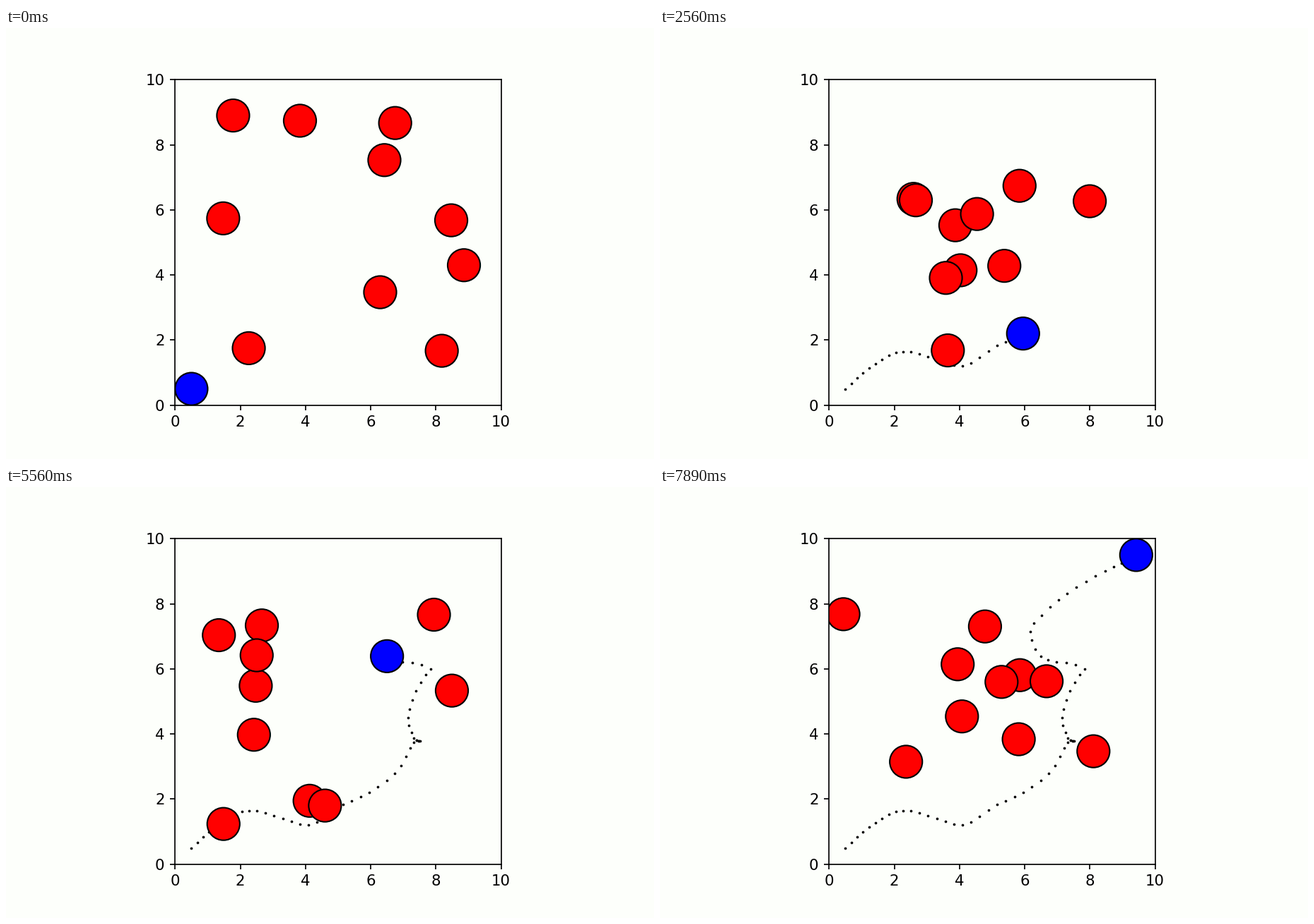
These frames come from a looping animation (917x611 px, 8000 ms). A matplotlib script:

```python
import numpy as np
import matplotlib.pyplot as plt
from matplotlib.animation import FuncAnimation
from matplotlib.patches import Circle

W, H, DPI = 917, 611, 128
LOOP_MS, TICK_MS, STEPS = 8000, 25, 72
LEAD_MS = 20  # a step shows on the tick nearest its due time
SIZE, RADIUS, SPEED = 10, 0.5, 0.2
PAPER = "#fdfffb"

# Obstacles: start x, start y, heading in degrees (back to front)
OBSTACLES = [
    (1.78, 8.90, -28.0), (3.83, 8.74, -87.5), (2.26, 1.75, 85.9),
    (6.75, 8.67, -107.4), (6.42, 7.53, -128.1), (1.475, 5.74, -61.9),
    (8.47, 5.68, 181.9), (8.86, 4.30, 160.0), (6.29, 3.47, 142.1),
    (8.18, 1.67, 92.3),
]

# Robot key points: step, x, y
KEYS = np.array([
    (0, 0.50, 0.50), (4, 1.23, 1.14), (9, 2.27, 1.65), (13, 3.30, 1.41),
    (16, 4.09, 1.20), (20, 5.15, 1.83), (23, 5.95, 2.20), (26, 6.73, 2.78),
    (30, 7.31, 3.74), (33, 7.51, 3.79), (36, 7.32, 3.87), (39, 7.15, 4.50),
    (44, 7.68, 5.82), (45, 7.83, 6.00), (46, 7.56, 6.12), (50, 6.50, 6.39),
    (53, 6.18, 7.15), (57, 7.04, 8.12), (65, 9.13, 9.33), (71, 9.42, 9.50),
])


def px(n):
    """Pixels to points."""
    return n * 72 / DPI


def bounce(x, y, heading):
    """Walk a straight line, turning back whenever a wall is touched."""
    pos, angle = np.array([x, y]), np.radians(heading)
    step = SPEED * np.array([np.cos(angle), np.sin(angle)])
    track = [pos]
    for _ in range(STEPS - 1):
        pos = pos + step
        if pos.min() < RADIUS or pos.max() > SIZE - RADIUS:
            step = -step
        track.append(pos)
    return np.array(track)


def spline(keys, t):
    """Cubic Hermite curve through timed key points."""
    times, points = keys[:, 0], keys[:, 1:]
    slopes = np.gradient(points, times, axis=0)
    k = np.clip(np.searchsorted(times, t, side="right") - 1, 0, len(times) - 2)
    span = (times[k + 1] - times[k])[:, None]
    u = (t - times[k])[:, None] / span
    ease = u * u * (3 - 2 * u)
    return (points[k] * (1 - ease) + points[k + 1] * ease
            + span * u * (1 - u) * (slopes[k] * (1 - u) - slopes[k + 1] * u))


tracks = [bounce(*o) for o in OBSTACLES]
path = spline(KEYS, np.arange(STEPS))

plt.rcParams.update({
    "font.family": "DejaVu Sans",
    "font.size": px(21.2),
    "axes.linewidth": px(1.7),
})
fig = plt.figure(figsize=(W / DPI, H / DPI), dpi=DPI, facecolor=PAPER)
fig.subplots_adjust(left=0.125, right=0.9, bottom=0.125, top=0.88)
ax = fig.add_subplot(aspect="equal", facecolor=PAPER)
ticks = range(0, SIZE + 1, 2)
ax.set(xlim=(0, SIZE), ylim=(0, SIZE), xticks=ticks, yticks=ticks)
ax.tick_params(length=px(7.4), width=px(1.7), pad=px(7.4))


def disc(color, z):
    return ax.add_patch(Circle((0, 0), RADIUS, fc=color, ec="black", lw=px(2.1), zorder=z))


trail, = ax.plot([], [], "o", color="black", ms=px(3.7), mew=0, zorder=0.5)
robot = disc("blue", 1)
balls = [disc("red", 1.1) for _ in tracks]


def update(i):
    step = min(int((i * TICK_MS + LEAD_MS) * STEPS / LOOP_MS), STEPS - 1)
    trail.set_data(*path[:step + 1].T)
    robot.center = path[step]
    for ball, track in zip(balls, tracks):
        ball.center = track[step]
    return [trail, robot, *balls]


anim = FuncAnimation(fig, update, frames=LOOP_MS // TICK_MS, interval=TICK_MS,
                     repeat=True, repeat_delay=0)
plt.show()
```
